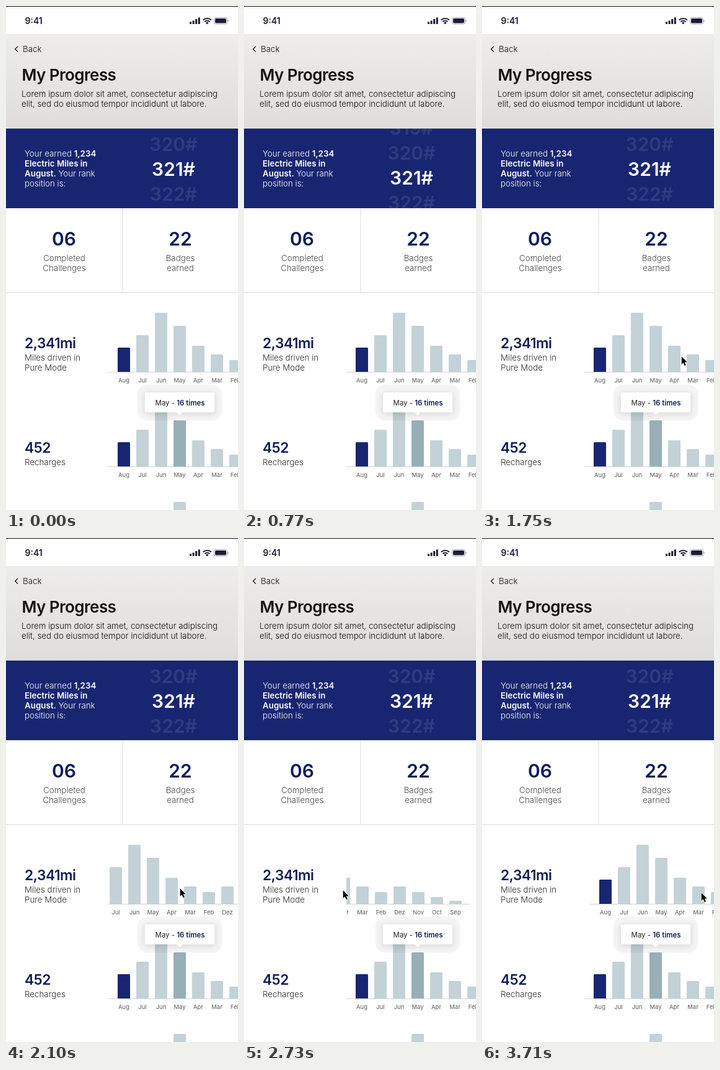
Write an HTML page that moves like this. It is 374 by 810 pixels and loops after 3.78 s.

```html
<!DOCTYPE html>
<html lang="en">
<head>
<meta charset="utf-8">
<title>My Progress</title>
<style>
  html, body { margin: 0; width: 100%; height: 100%; overflow: hidden; background: #fff; }
  svg { display: block; width: 374px; height: 810px; font-family: Inter, "Open Sans", sans-serif; }
  .copy { font-size: 13.35px; font-weight: 300; }
  .bold { font-weight: 600; }
  .mid { text-anchor: middle; }
  .big { font-size: 30px; font-weight: 600; }
  .stat { font-size: 22.8px; font-weight: 600; letter-spacing: -.5px; }
  .month { font-size: 9.5px; fill: #5c5c5e; text-anchor: middle; }
  .navy { fill: #111b5c; }
  .grey { fill: #4a4a4c; }
  .dark { fill: #2c2c2e; }
</style>
</head>
<body>
<svg viewBox="0 0 374 810">
  <defs>
    <linearGradient id="sand" x2="0" y2="1">
      <stop stop-color="#eeedeb"/>
      <stop offset="1" stop-color="#dfddda"/>
    </linearGradient>
    <clipPath id="wheelClip"><path d="M188 197h186v128H188z"/></clipPath>
    <clipPath id="chartClip"><path d="M165 470h209v140H165z"/></clipPath>
    <filter id="soft" x="-30%" y="-60%" width="160%" height="220%"><feGaussianBlur stdDeviation="5"/></filter>
  </defs>

  <rect width="374" height="810" fill="#fff"/>
  <rect width="374" height="1" fill="#111"/>

  <!-- status bar -->
  <g fill="#1b1c33">
    <text x="30.5" y="29" font-size="14" font-weight="600">9:41</text>
    <path d="M296 25.500h3v3.500h-3zM300.600 23.500h3v5.500h-3zM305.200 21h3v8h-3zM309.800 18.500h3v10.500h-3z"/>
    <g fill="none" stroke="#1b1c33" stroke-width="2.100">
      <path d="M317.700 22.600a9.500 9.500 0 0 1 13.200 0M320.300 25.300a5.800 5.800 0 0 1 8 0"/>
    </g>
    <path d="M322 26.900a3.300 3.300 0 0 1 4.600 0l-2.300 2.600z"/>
    <rect x="335.500" y="18.500" width="21" height="10.500" rx="3" fill="none" stroke="#1b1c33" stroke-opacity=".4"/>
    <rect x="337" y="20" width="18" height="7.500" rx="1.700"/>
    <path d="M357.500 22v3.600q1.300-.5 1.300-1.800t-1.300-1.800z" fill-opacity=".5"/>
  </g>

  <!-- header -->
  <rect y="45" width="374" height="152" fill="url(#sand)"/>
  <path d="M19 65l-4.300 4.300 4.300 4.300" fill="none" stroke="#111" stroke-width="1.300"/>
  <g fill="#111">
    <text class="copy" x="27" y="74">Back</text>
    <text x="25.500" y="120" font-size="26" font-weight="600" letter-spacing="-.6">My Progress</text>
    <text class="copy" x="25" y="146">Lorem ipsum dolor sit amet, consectetur adipiscing</text>
    <text class="copy" x="25" y="162">elit, sed do eiusmod tempor incididunt ut labore.</text>
  </g>

  <!-- rank -->
  <rect y="197" width="374" height="128" fill="#182671"/>
  <g class="copy" fill="#fff">
    <text x="30" y="242">Your earned <tspan class="bold">1,234</tspan></text>
    <text class="bold" x="30" y="258">Electric Miles in</text>
    <text x="30" y="274"><tspan class="bold">August.</tspan> Your rank</text>
    <text x="30" y="290">position is:</text>
  </g>
  <g clip-path="url(#wheelClip)"><g id="wheel" class="big mid" fill="#fff"></g></g>

  <!-- totals -->
  <path d="M0 460.500h374M188 325v135.500" stroke="#dcdcdc" fill="none"/>
  <g class="big mid navy">
    <text x="93.500" y="385">06</text>
    <text x="281" y="385">22</text>
  </g>
  <g class="copy mid grey">
    <text x="94" y="410">Completed</text>
    <text x="94" y="426">Challenges</text>
    <text x="281" y="410">Badges</text>
    <text x="281" y="426">earned</text>
  </g>

  <!-- charts -->
  <text class="stat navy" x="30" y="550">2,341mi</text>
  <text class="stat navy" x="30" y="718">452</text>
  <g class="copy dark">
    <text x="30" y="570">Miles driven in</text>
    <text x="30" y="586">Pure Mode</text>
    <text x="30" y="738">Recharges</text>
  </g>
  <g clip-path="url(#chartClip)"><g id="miles"></g></g>
  <g id="charges"></g>
  <path d="M270 810v-11.500q0-1.500 1.500-1.500h17q1.500 0 1.500 1.500v11.500z" fill="#c3d2d6"/>

  <!-- tooltip -->
  <rect x="211.500" y="608.500" width="137" height="58" rx="16" fill="#000" fill-opacity=".04"/>
  <rect x="222" y="621" width="116" height="36" rx="5" fill="#000" fill-opacity=".1" filter="url(#soft)"/>
  <path d="M226.500 621h107q2.500 0 2.500 2.500v27q0 2.500-2.500 2.500H285l-5 4.500-5-4.500h-48.500q-2.500 0-2.500-2.500v-27q0-2.500 2.500-2.500z" fill="#fff"/>
  <text class="mid" x="280.500" y="642" font-size="11.400" fill="#222">May - <tspan class="bold navy">16 times</tspan></text>

  <path id="cursor" d="M.7 1.200v12.800l2.900-2.700 2.200 4.900 2-.9-2.100-4.800h4.100z" fill="#000" stroke="#fff" stroke-width="1.600" paint-order="stroke" stroke-linejoin="round"/>
</svg>

<script>
const LOOP = 3780, STEP = 70, END = -132;
const MONTHS = 'Aug Jul Jun May Apr Mar Feb Dez Nov Oct Sep'.split(' ');
const HEIGHTS = [39, 59, 95, 74, 42, 28, 19, 28, 19, 11, 5];
const $ = id => document.getElementById(id);

function add(parent, tag, attrs, text) {
  const el = document.createElementNS('http://www.w3.org/2000/svg', tag);
  for (const k in attrs) el.setAttribute(k, attrs[k]);
  if (text) el.textContent = text;
  parent.append(el);
}

function drawChart(group, base, active) {
  MONTHS.forEach((name, i) => {
    const x = 180 + i * 30, h = HEIGHTS[i];
    const fill = i === 0 ? '#182671' : i === active ? '#97afb5' : '#c3d2d6';
    add(group, 'path', { fill, d: `M${x} ${base}v${1.5 - h}q0-1.5 1.5-1.5h17q1.5 0 1.5 1.5v${h - 1.5}z` });
    add(group, 'text', { class: 'month', x: x + 10, y: base + 17 }, name);
  });
  add(group, 'path', { d: `M165 ${base + .5}h349`, stroke: '#d5d5d5' });
}

for (let n = 318; n < 325; n++) {
  add($('wheel'), 'text', { x: 270, y: 273 + (n - 321) * 40, 'fill-opacity': n === 321 ? 1 : .1 }, n + '#');
}
drawChart($('miles'), 588);
drawChart($('charges'), 740, 3);

const linear = u => u;
const easeIn = u => u * u;
const easeOut = u => 1 - (1 - u) * (1 - u);
const glide = u => 1 - (1 - u) ** 1.4;
const sine = u => (1 - Math.cos(Math.PI * u)) / 2;

// each key: [time, value, easing towards it]
function track(keys, t) {
  let prev = keys[0];
  if (t <= prev[0]) return prev[1];
  for (const key of keys) {
    if (t < key[0]) {
      const u = (t - prev[0]) / (key[0] - prev[0]);
      return prev[1] + (key[1] - prev[1]) * (key[2] || linear)(u);
    }
    prev = key;
  }
  return prev[1];
}

const WHEEL = [[290, 0], [840, 15, sine], [1270, 0, easeOut]];
const CURSOR_X = [[1400, 358], [1540, 333, easeOut], [1610, 333], [1750, 321], [2100, 280, easeIn],
  [2520, 157, glide], [2660, 157], [2730, 159], [3080, 198, sine], [3270, 198], [3710, 353, sine]];
const CURSOR_Y = [[1400, 565], [1750, 562], [2100, 562], [2520, 565], [3290, 566], [3710, 569]];

// past either end the chart follows the pointer at half speed
function rubber(x) {
  if (x > 0) return x / 2;
  return x < END ? END + (x - END) / 2 : x;
}

function chartShift(t, x) {
  if (t <= 1750) return 0;
  if (t < 2730) return rubber(x - 323);
  if (t < 3080) return track([[2730, rubber(157 - 323)], [3080, END, easeOut]], t);
  return rubber(END + Math.max(0, x - 203));
}

function render(t) {
  const x = track(CURSOR_X, t), y = track(CURSOR_Y, t);
  $('wheel').setAttribute('transform', `translate(0 ${track(WHEEL, t)})`);
  $('miles').setAttribute('transform', `translate(${Math.round(chartShift(t, x))} 0)`);
  $('cursor').setAttribute('transform', `translate(${Math.round(x)} ${Math.round(y)})`);
  $('cursor').setAttribute('visibility', t < 1400 ? 'hidden' : 'visible');
}

const start = performance.now();
function tick() {
  const t = (performance.now() - start) % LOOP;
  render(Math.floor(t / STEP) * STEP);
  requestAnimationFrame(tick);
}
tick();
</script>
</body>
</html>
```
